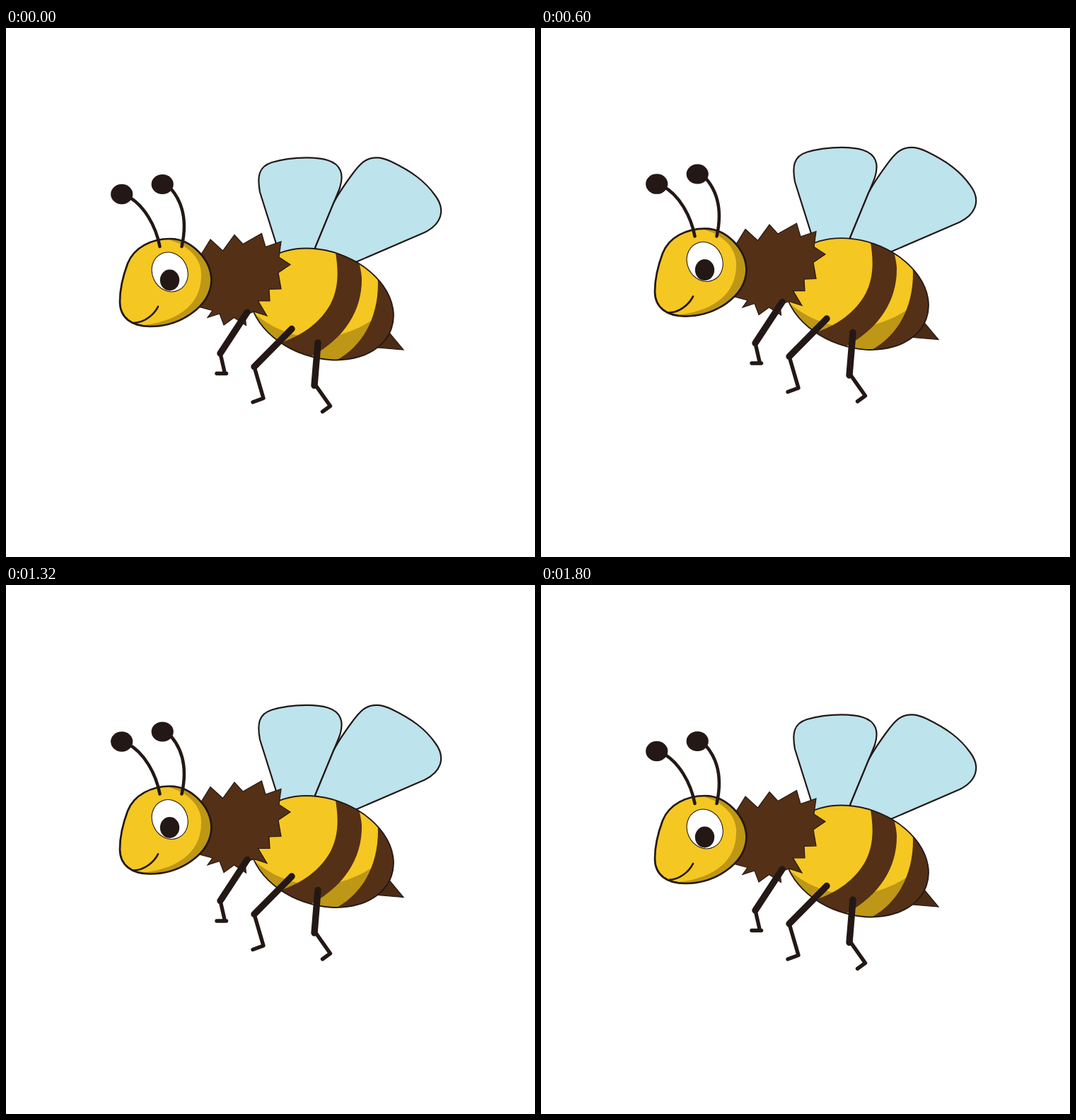
These frames come from a looping animation (748 px wide and 748 px high, 1.83 s). An HTML page:

```html
<!DOCTYPE html>
<html lang="en">
<head>
<meta charset="utf-8">
<title>Hovering bee</title>
<style>
  html, body { margin: 0; width: 100%; height: 100%; overflow: hidden; background: #fff; }
  svg { display: block; width: 100%; height: 100%; }
  .ink { fill: #231815; }
  .brown { fill: #543016; }
  .sting { fill: #4a2b16; }
  .yellow { fill: #f5c722; }
  .shade { fill: #be9717; }
  .wing { fill: #bde3ed; }
  .line { stroke: #231815; stroke-linejoin: round; stroke-linecap: round; }
  .open { fill: none; }
  .thin { stroke-width: 1.2; stroke-linejoin: miter; }
  .mid { stroke-width: 2.2; }
  .bold { stroke-width: 2.7; }
  .feeler { stroke-width: 4.5; }
  .thigh { stroke-width: 9.4; }
  .shin { stroke-width: 5.4; }
</style>
</head>
<body>
<svg viewBox="0 0 748 748">
  <defs>
    <ellipse id="belly" cx="446" cy="390.5" rx="104.8" ry="75.2" transform="rotate(19.3 446 390.5)"/>
    <path id="skull" d="M161 387C161 370 166 349 172 333C181 310 206 298 232 298C262 298 290 327 290.500 357C289 395 245 422 204 422C178 422 161 410 161 387Z"/>
    <clipPath id="bellyClip"><use href="#belly"/></clipPath>
    <clipPath id="skullClip"><use href="#skull"/></clipPath>
  </defs>

  <g id="bee">
    <path class="wing line mid" d="M388 324L359 232C355 210 357 196 376 190Q397 183.500 425 183.300Q444 183.300 455 187C474 193 478 207 472 226Q469 234 463 248L437 311L425 330Z"/>
    <path class="wing line mid" d="M437 311L463 248Q469 235 488 209C501 191 509 183.300 524 183.300C531 183.300 537 185 545 189C574 203 593 217 607 237C622 257 616 277 592 289L497 330L460 335Z"/>

    <path class="sting line thin" d="M542 431L562 455L526 452Z"/>

    <use href="#belly" class="yellow"/>
    <g clip-path="url(#bellyClip)">
      <path class="shade" d="M345 398C380 432 450 462 525 408L560 490H340Z"/>
      <path class="brown" d="M465 312C471 345 470 368 459 390C444 417 420 434 386 446L400 480L432 464C480 438 504 398 503 353Q502 340 497 325Z"/>
      <path class="brown" d="M525 345C530 390 516 444 465 471L500 490L570 450V340Z"/>
    </g>
    <use href="#belly" class="line open" stroke-width="1.800"/>

    <path class="brown line thin" d="M276 320L289 299L306.500 315L323 292.500L335 305.500L361.500 290.500L367 309.500L389 302L386 324L402 334.500L385 346L389 369L372 369.500L373 386H356.500L369 407L350.500 401L338 406L339.500 420.500L322.500 409.500L308 420L302 404L285 409.500L292 399.500L268 393Z"/>

    <use href="#skull" class="yellow"/>
    <path class="shade" clip-path="url(#skullClip)" d="M220 297C262 305 277 330 276 350C276 390 245 414 196 420L200 430L300 425V290Z"/>
    <use href="#skull" class="line open bold"/>

    <ellipse class="line" fill="#fff" stroke-width="1.100" cx="231.700" cy="345" rx="24.900" ry="28.500" transform="rotate(-25 231.700 345)"/>
    <ellipse class="ink" cx="231.500" cy="356.500" rx="13.700" ry="15"/>
    <path class="line open bold" d="M180 417C195 417 209 406 215 394"/>

    <path class="line open feeler" d="M217.500 309C212 280 195 250 172 238M248.500 309C255 280 253 250 233 227"/>
    <ellipse class="ink" cx="163.700" cy="235" rx="15.600" ry="14.300"/>
    <ellipse class="ink" cx="221.200" cy="221" rx="15.600" ry="14"/>

    <path class="line open thigh" d="M341 402L303 460M404 425.500L351 479M441 445L436 505.500"/>
    <path class="line open shin" d="M303 460L309.500 488.500H298M311.500 488.500H298M351 479L364 523.500L349 529M437 504L458.500 534.500L447.500 542.500"/>
  </g>
</svg>
<script>
  const LOOP = 1830, STEP = 30, LIFT = 22.5;
  // [time in ms, share of the full lift]
  const keys = [[0, 0], [30, 0], [450, 1], [870, 0], [1140, 0], [1440, 1], [1800, 0], [LOOP, 0]];
  const bee = document.getElementById('bee');

  function height(t) {
    const i = keys.findIndex(k => t < k[0]);
    const [t0, a] = keys[i - 1], [t1, b] = keys[i];
    return LIFT * (a + (b - a) * (t - t0) / (t1 - t0));
  }

  const start = performance.now();
  function draw() {
    const t = Math.max(0, performance.now() - start) % LOOP;
    const y = height(Math.floor(t / STEP) * STEP);
    bee.setAttribute('transform', `translate(0 ${-y})`);
    requestAnimationFrame(draw);
  }
  draw();
</script>
</body>
</html>
```
